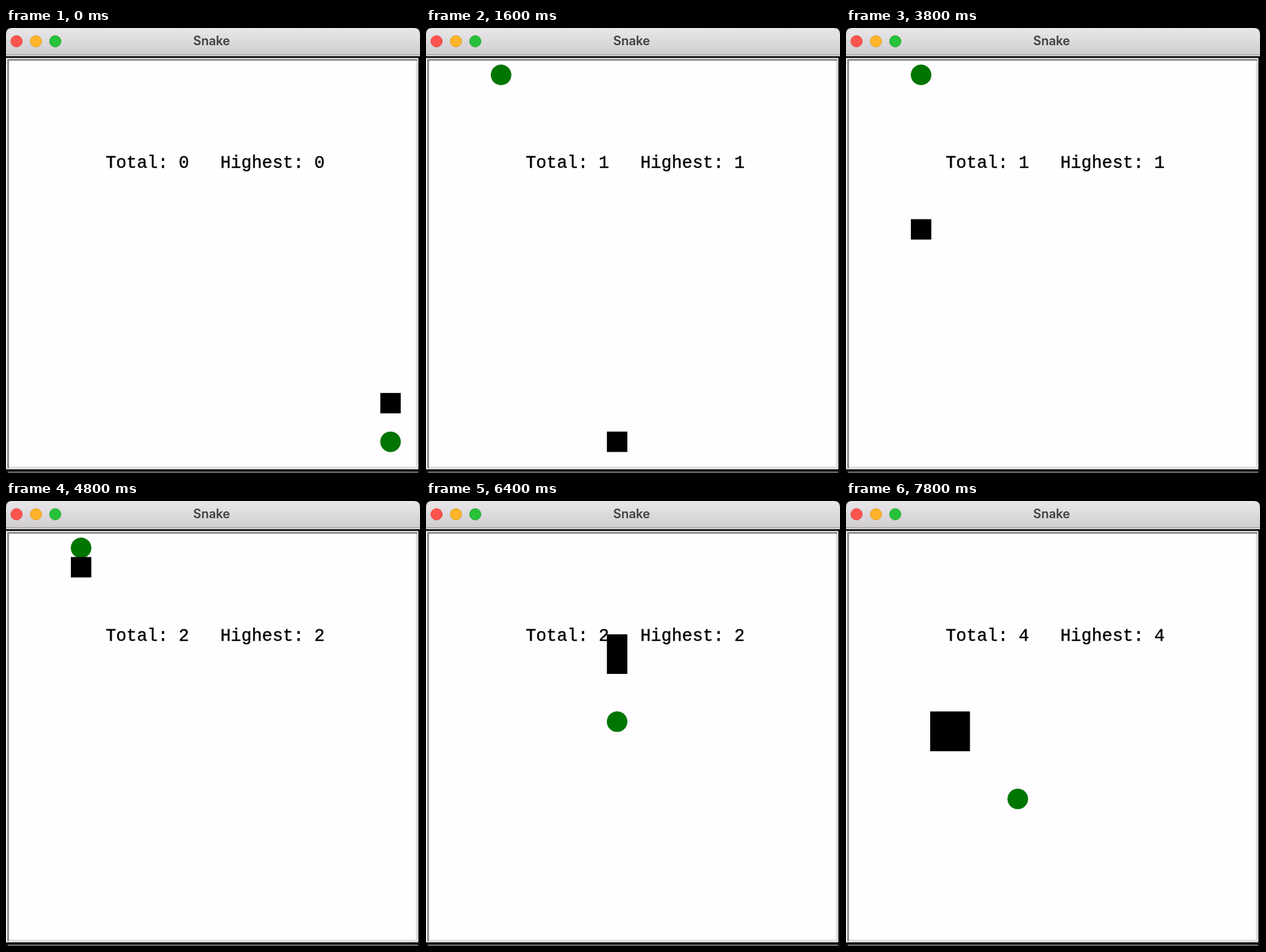
Animation of 600x646 px, one loop 8 s. Source, as an HTML page:

```html
<!DOCTYPE html>
<html lang="en">
<head>
<meta charset="utf-8">
<title>Snake</title>
<style>
  html, body { margin: 0; width: 100%; height: 100%; overflow: hidden; background: #fff; }
  svg { display: block; width: 600px; height: 646px; }
  .title { font: 600 18px Inter, sans-serif; fill: #403e40; text-anchor: middle; }
  .score { font: 25.2px "Liberation Mono", "Courier New", monospace; white-space: pre;
           stroke: #000; stroke-width: .4; }
</style>
</head>
<body>
<svg viewBox="0 0 600 646">
  <defs>
    <linearGradient id="bar" x2="0" y2="1">
      <stop stop-color="#e9e7e9"/>
      <stop offset="1" stop-color="#cfcdcf"/>
    </linearGradient>
  </defs>
  <rect width="600" height="646" fill="#111"/>
  <path d="M0 39V9Q0 0 9 0H591Q600 0 600 9V39Z" fill="url(#bar)"/>
  <rect y="38" width="600" height="1.5" fill="#b5b3b5"/>
  <rect y="39.5" width="600" height="1.5" fill="#f4f2f4"/>
  <rect y="41" width="600" height="2.5" fill="#000"/>
  <rect y="43.5" width="597.5" height="597" fill="#fffdff"/>
  <path d="M595.3 46V638H3" fill="none" stroke="#dfdddf" stroke-width="2.6"/>
  <path d="M3 639V46.2H596" fill="none" stroke="#868486" stroke-width="2.6"/>
  <path d="M3 644.7H597" stroke="#8a888a" stroke-width="1.4"/>
  <g stroke-width="1">
    <circle cx="15.3" cy="19.3" r="8.2" fill="#ff544d" stroke="#e2463f"/>
    <circle cx="43.4" cy="19.3" r="8.2" fill="#ffb429" stroke="#e09e22"/>
    <circle cx="71.4" cy="19.3" r="8.2" fill="#27c13a" stroke="#1dad2b"/>
  </g>
  <text class="title" x="298" y="25.3">Snake</text>
  <text class="score" id="score" x="144.4" y="202.7"></text>
  <polygon id="food" fill="#007500"/>
  <path id="snake"/>
</svg>
<script>
  const LOOP = 8000, TICK = 200, PITCH = 28.03, SIZE = 29.6;
  const $ = id => document.getElementById(id);
  const centre = ([col, row]) => [108.8 + col * PITCH, 68.1 + row * PITCH];

  // Corners of the head's route, in grid cells [column, row].
  const corners = [[16, 17], [16, 19], [0, 19], [0, 0], [6, 0], [6, 9], [1, 9], [1, 10], [4, 10]];
  const route = [corners[0]];
  for (const [toCol, toRow] of corners.slice(1)) {
    let [col, row] = route.at(-1);
    while (col !== toCol || row !== toRow) {
      col += Math.sign(toCol - col);
      row += Math.sign(toRow - row);
      route.push([col, row]);
    }
  }

  const foods = [[16, 19], [0, 0], [6, 9], [1, 9], [5, 13]];
  const mealMoves = [2, 37, 52, 57];
  const mealsBy = move => mealMoves.filter(meal => meal <= move).length;

  function square(cell) {
    const [x, y] = centre(cell);
    return `M${x - SIZE / 2} ${y - SIZE / 2}h${SIZE}v${SIZE}h${-SIZE}z`;
  }

  function disc(cell) {
    const [x, y] = centre(cell);
    return Array.from({ length: 20 }, (_, i) => {
      const angle = i * Math.PI / 10;
      return [x + 15 * Math.cos(angle), y + 15 * Math.sin(angle)];
    }).join(" ");
  }

  function draw(time) {
    const tick = Math.floor(time % LOOP / TICK);
    const move = Math.floor(0.72 + 1.51 * tick);
    const eaten = mealsBy(move);
    const total = mealsBy(move + 1); // the score refreshes one move ahead of the pieces
    const body = route.slice(Math.max(0, move + 1 - Math.max(1, eaten)), move + 1);
    $("snake").setAttribute("d", body.map(square).join(""));
    $("food").setAttribute("points", disc(foods[eaten]));
    $("score").textContent = `Total: ${total}   Highest: ${total}`;
  }

  const start = performance.now();
  function frame() {
    draw(performance.now() - start);
    requestAnimationFrame(frame);
  }
  frame();
</script>
</body>
</html>
```
